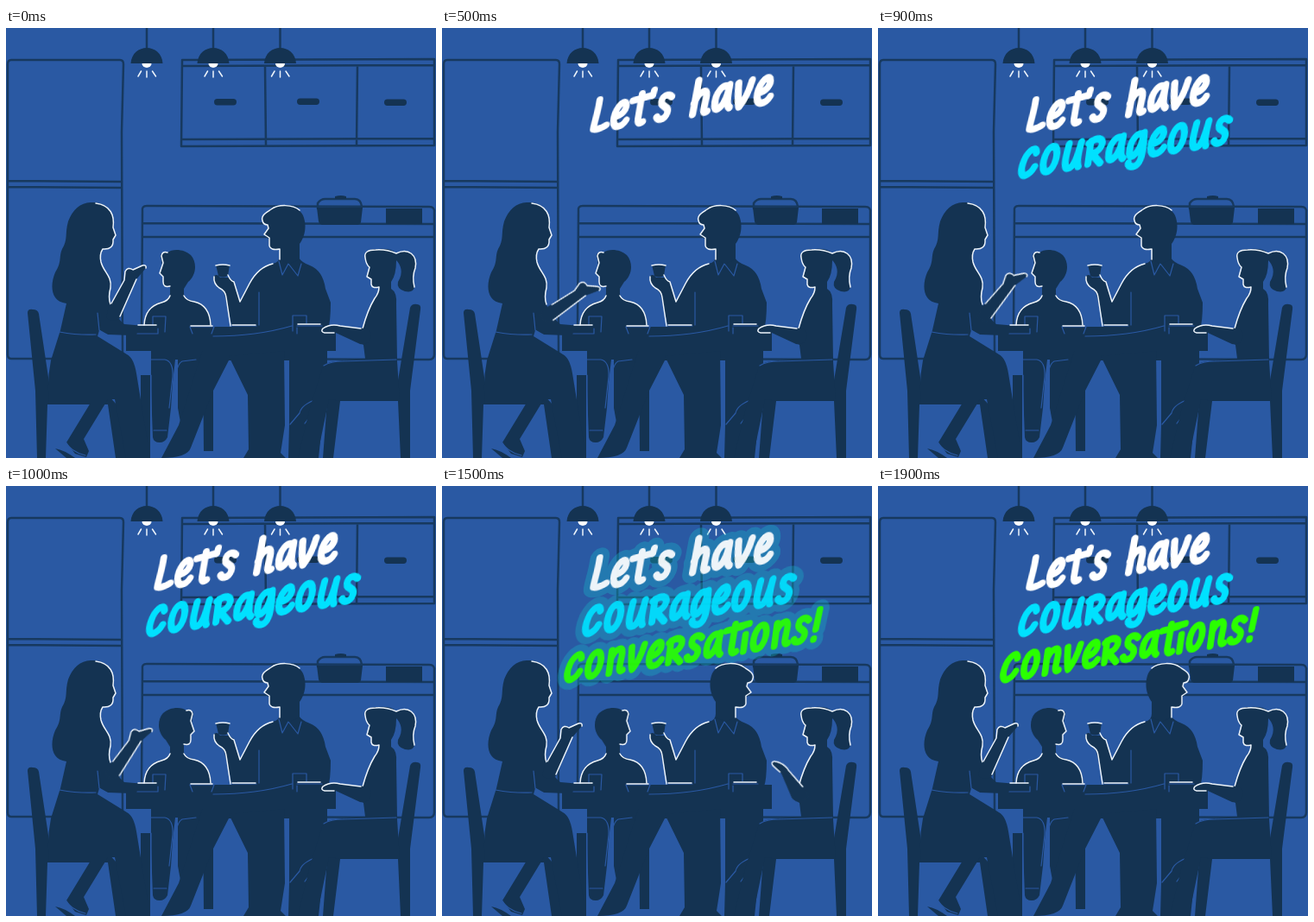
Write an HTML page that moves like this. It is 498 by 498 pixels and loops after 2 s.

```html
<!DOCTYPE html>
<html lang="en">
<head>
<meta charset="utf-8">
<title>Let's have courageous conversations!</title>
<style>
  html, body { margin: 0; width: 100%; height: 100%; overflow: hidden; background: #2a59a3; }
  svg { display: block; width: 100%; height: 100%; }
  .dark { fill: #143352; }
  .line { fill: none; stroke: #17395f; stroke-width: 2.5; stroke-linecap: round; stroke-linejoin: round; }
  .rim { fill: none; stroke: #edf4fb; stroke-width: 1.5; stroke-linecap: round; stroke-linejoin: round; }
  .seam { fill: none; stroke: #2a59a3; stroke-width: 1.2; stroke-linecap: round; stroke-linejoin: round; }
  .letters { fill: none; stroke-width: 8; stroke-linecap: round; stroke-linejoin: round; }
  .halo { stroke: #18b4c8; stroke-width: 23; opacity: 0; animation: glow 2s infinite; }
  #title { animation: tint 2s infinite; }
  .word, .arm, .head { animation: 2s infinite; }
  #word0 { stroke: #fff; animation-name: show0; }
  #word1 { stroke: #fff; animation-name: show1; }
  #word2 { stroke: #00e1ff; animation-name: show2; }
  #word3 { stroke: #2aff00; animation-name: show3; }
  #motherArm { transform-origin: 122px 330px; animation-name: gesture; }
  #girlArm { transform-origin: 414px 357px; animation-name: raise; }
  #boyHead { transform-origin: 198px 0; animation-name: turnBoy; }
  #fatherHead { transform-origin: 328.5px 0; animation-name: turnFather; }

  @keyframes show0 { 0%, 9.9% { opacity: 0 } 10%, 100% { opacity: 1 } }
  @keyframes show1 { 0%, 19.9% { opacity: 0 } 20%, 100% { opacity: 1 } }
  @keyframes show2 { 0%, 34.9% { opacity: 0 } 35%, 100% { opacity: 1 } }
  @keyframes show3 { 0%, 54.9% { opacity: 0 } 55%, 100% { opacity: 1 } }
  @keyframes glow {
    0%, 60% { opacity: 0; animation-timing-function: steps(3) }
    75% { opacity: .36; animation-timing-function: steps(2) }
    85%, 100% { opacity: 0 }
  }
  @keyframes tint {
    0%, 60% { opacity: 1; animation-timing-function: steps(3) }
    75% { opacity: .92; animation-timing-function: steps(2) }
    85%, 100% { opacity: 1 }
  }
  @keyframes gesture {
    0% { transform: rotate(0deg); animation-timing-function: steps(5) }
    25% { transform: rotate(29deg); animation-timing-function: steps(7) }
    60%, 100% { transform: rotate(0deg) }
  }
  @keyframes raise {
    0%, 60% { transform: rotate(0deg); animation-timing-function: steps(3) }
    75% { transform: rotate(42deg); animation-timing-function: steps(4) }
    95%, 100% { transform: rotate(0deg) }
  }
  @keyframes turnBoy { 0%, 49.9% { transform: none } 50%, 100% { transform: scaleX(-1) } }
  @keyframes turnFather { 0%, 54.9% { transform: none } 55%, 100% { transform: scaleX(-1) } }
</style>
</head>
<body>
<svg viewBox="0 0 498 498" role="img" aria-label="Let's have courageous conversations!">
  <defs>
    <g id="lamp">
      <path class="line" d="M0 0V24"/>
      <path class="dark" d="M-18.5 41C-17 17 17 17 18.5 41Z"/>
      <path d="M-5.5 41a5.5 5 0 0 0 11 0Z" fill="#fff"/>
      <path class="rim" d="M-6.5 50L-10 56M0 50V57M6.5 50L10.5 56"/>
    </g>
  </defs>
  <rect width="498" height="498" fill="#2a59a3"/>

  <!-- kitchen -->
  <g class="line">
    <path d="M6 37H132Q136 37 136 42L134 120L135 378Q135 383 130 383H6Q2 383 2 378V42Q2 37 6 37ZM2 177L134 178M2 184L134 185"/>
    <path d="M204 37L496 36V136L203 137ZM204 44L496 43M204 129L496 128M300 44L301 136M407 44L406 136"/>
    <path d="M157 345L158 212Q157 206 163 206L490 207Q497 207 496 214V378Q496 384 490 384L230 383M158 226L496 227M158 242L496 242"/>
    <path d="M361 209V203Q364 198 370 198H404Q411 198 412 207"/>
  </g>
  <g class="dark">
    <path d="M360 208H413L411 225Q410 228 406 228H367Q363 228 362 224ZM381 195Q388 193 394 195V198H381ZM440 209H482V227H440Z"/>
    <rect x="241" y="82" width="26" height="7.5" rx="3.7"/>
    <rect x="337" y="81.5" width="26" height="7.5" rx="3.7"/>
    <rect x="438" y="82.5" width="26" height="7.5" rx="3.7"/>
  </g>
  <use href="#lamp" x="163"/><use href="#lamp" x="240"/><use href="#lamp" x="317.5"/>

  <g class="letters halo" id="halo"></g>
  <g class="letters" id="title"></g>

  <!-- chairs -->
  <g class="dark">
    <path d="M25 330Q25 325 31 326Q37 326 38 331L50 411L118 425L128 436L140 498H127L118 436H48L46 498H36L34 420Z"/>
    <path d="M468 324Q470 319 476 320Q481 320 480 326L468 420L468 498H457L454 432H387L379 498H367L373 418L454 408Z"/>
  </g>

  <!-- boy -->
  <g class="dark">
    <path d="M190 292H206V308Q206 314 217 316Q237 320 238 346H159Q160 322 180 317Q190 315 190 308Z"/>
    <path d="M168 372H232V384H196L193 410L191 440L187 474Q184 480 178 480Q171 480 170 474L168 420Z"/>
    <path d="M199 380H240V430L203 462L199 440Z"/>
    <path d="M156 402H167V498H156ZM228 374H240V490H229Z"/>
  </g>
  <path class="rim" d="M160 344Q161 323 180 318Q188 316 190 310M206 310Q209 316 218 317Q236 321 237 344"/>
  <g class="head" id="boyHead">
    <path class="dark" d="M180 268C177 262 181 258 187 260C193 255 207 256 214 263C222 272 220 287 211 294L206 302H190L190 299Q182 301 182 295L182 288L178 284L181 277Z"/>
    <path class="rim" d="M187 260Q181 258 180 264L182 272L178 284L182 288V294Q182 301 190 299"/>
  </g>

  <!-- father -->
  <g class="dark">
    <path d="M318 256H339V266Q343 272 352 275Q367 281 370 302L376 318Q376 340 373 348H262L254 312Q253 304 244 299Q239 293 241 287Q245 284 248 289H258L264 293L271 317L282 296Q292 277 309 273Q317 271 317 264Z"/>
    <path d="M243 274H259L257 287Q251 290 246 287Z"/>
    <path d="M228 372H330V385H258L240 420L214 486Q210 498 180 498L200 460Z"/>
    <path d="M258 380L322 374L323 460L318 492L324 498H275L281 488L280 425Z"/>
    <path d="M328 374H372V400L362 498H327L328 460Z"/>
  </g>
  <path class="rim" d="M243 275Q251 273 259 275M241 288Q240 296 247 301Q254 304 255 312L260 345M257 286Q260 293 264 294L271 317L282 296Q292 277 309 273"/>
  <path class="seam" d="M316 270L320 286L327 273L338 287L342 273M293 306V344M360 430Q342 436 340 446L329 459M346 458L361 438"/>
  <g class="head" id="fatherHead">
    <path class="dark" d="M297 223C295 216 304 213 307 209C319 202 338 205 344 217C349 229 346 242 340 250V268L328 273L317 268V256Q306 258 305 253L304 244L299 239L303 232V228Q297 228 297 223Z"/>
    <path class="rim" d="M340 211C332 204 315 204 307 210C301 214 295 217 297 223Q298 228 303 228L304 232L299 239L305 243V252Q306 258 317 256V268"/>
  </g>

  <!-- girl -->
  <path class="dark" d="M416 266C413 257 425 256 431 256Q447 255 452 261C466 254 477 263 474 278Q470 288 473 300Q472 307 462 305Q452 302 454 294C461 283 457 274 452 269Q452 286 446 294V302Q453 306 452 320L453 386L456 432H389L374 430L360 498H338L352 440L366 395Q369 387 382 386L416 383L414 367Q406 363 408 355L414 345Q419 325 427 312Q432 306 432 300Q423 302 423 297V292L418 288L421 280Z"/>
  <path class="rim" d="M452 261Q440 256 428 257Q414 257 416 266Q417 274 421 277L418 288L423 291V297Q424 302 432 300Q432 307 427 313Q419 326 413 348M452 261C466 254 477 263 474 278Q470 288 473 300"/>
  <path class="seam" d="M368 391Q376 386 390 386L452 384"/>

  <!-- mother -->
  <g class="dark">
    <path d="M98 202C117 201 127 214 124 231L127 240L124 245Q125 257 112 256Q108 262 110 271C113 283 123 287 121 301Q118 312 121 321Q130 338 137 343L173 346Q183 348 181 353L172 357L118 355L108 350L106 357L140 378Q148 382 151 400L167 498H139L126 430H118L90 476L96 490L93 497L80 493L70 480L98 434H50Q47 410 52 385L63 350L70 319C51 317 51 297 57 283C65 271 61 265 65 256C72 245 68 238 72 224Q80 203 98 202Z"/>
    <path d="M57 487Q68 489 80 498H70Z"/>
  </g>
  <path class="rim" d="M104 203C121 205 126 217 124 231L127 240L124 245Q125 257 112 256Q108 262 110 271C113 283 123 287 121 301Q118 312 121 320"/>
  <path class="seam" d="M62 352Q84 356 104 355M106 330L108 350L118 356M68 478Q75 491 92 495"/>
  <g class="arm" id="motherArm">
    <path class="dark" d="M119 323L137 292L138 282Q141 276 147 280L158 275Q163 274 162 278L151 291L132 336Q122 342 116 335Z"/>
    <path class="rim" d="M122 319L137 292L138 282Q141 276 147 280L158 275Q163 274 162 278M151 291L132 334"/>
  </g>

  <!-- table -->
  <path class="dark" d="M139 346H382V374H139Z"/>
  <g class="arm" id="girlArm">
    <path class="dark" d="M416 348L386 345Q376 342 367 348Q364 352 369 353L382 353L410 366Q420 368 423 357Q423 349 416 348Z"/>
    <path class="rim" d="M411 348L387 345Q376 342 367 348Q364 352 369 353H380"/>
  </g>
  <path class="dark" d="M169 333H185V352H169ZM332 332H348V352H332Z"/>
  <path class="seam" d="M170 334H185L184 352M170 334V344M332 351V333H348V342M213 346H241L238 354M213 346L216 354M261 345H290M337 345H366M240 357Q290 357 331 345M168 384H184Q194 386 193 404L189 440M196 418Q196 390 204 386L220 384M168 402V460M171 466H186M337 354V347M176 348V354H152"/>
  <path class="rim" d="M153 344H174M214 345H239M262 344H289M338 343H364"/>
</svg>
<script>
  // Brush lettering: advance width and centre-line strokes, baseline at 0.
  const bowl = "M18-22C12-31 2-20 4-6C6 4 16-4 18-24";
  const glyphs = {
    L: [22, "M6-34C6-20 3-10 3-2C8 0 14-2 18-4"],
    e: [23, "M5-12C13-12 19-18 16-25C12-31 3-20 4-8C5 3 15 1 19-6"],
    t: [20, "M11-33L10-6C10 0 13 1 16-1M1-27L20-29"],
    "'": [9, "M5-35L4-29"],
    s: [22, "M18-24C13-30 4-26 7-18C9-14 17-13 15-6C13 1 5 1 3-4"],
    h: [24, "M6-36L4 0M4-12C8-24 18-28 17-16L16-4C16 0 18 0 20-1"],
    a: [24, bowl + "M18-26C17-12 17-4 21-1"],
    v: [23, "M4-26C5-12 6-4 8 0C13-6 17-16 19-27"],
    c: [24, "M18-23C17-31 9-28 5-18C1-6 4 1 9 0C13-1 16-4 18-8"],
    o: [25, "M12-27C3-26 0-1 9 0C19 0 22-27 12-27Z"],
    u: [26, "M6-27C4-14 2 0 9 0C15 0 18-14 20-27C18-14 18-4 20 0"],
    r: [24, "M5-1V-26M3-24C14-32 22-24 17-17C15-13 10-12 6-12M8-12L19 0"],
    g: [24, bowl + "M18-26C20-6 20 9 11 10C6 10 4 7 4 5"],
    n: [25, "M5-26V0M5-16C9-28 19-31 18-18L17-6C17-1 19 0 21-1"],
    i: [12, "M5-19V0M-3-30L8-31"],
    "!": [13, "M8-34L6-12M5-1V-.5"]
  };
  const words = [
    ["Let's", 172, 119.5, 1],
    ["have", 286, 101, 1.05],
    ["courageous", 162, 172, 1.025],
    ["conversations!", 141, 225.5, 0.98]
  ];

  function add(parent, name, attributes) {
    const node = document.createElementNS("http://www.w3.org/2000/svg", name);
    for (const key in attributes) node.setAttribute(key, attributes[key]);
    return parent.appendChild(node);
  }

  const halo = document.getElementById("halo");
  const title = document.getElementById("title");

  words.forEach(([word, x, y, scale], index) => {
    const transform = `translate(${x} ${y}) rotate(-9.3) skewX(-17) scale(${scale})`;
    const front = add(title, "g", { id: "word" + index, class: "word" });
    const layers = [halo, front].map(parent => add(parent, "g", { transform }));
    let pen = 0;
    for (const letter of word) {
      const [advance, d] = glyphs[letter];
      layers.forEach(layer => add(layer, "path", { d, transform: `translate(${pen})` }));
      pen += advance;
    }
  });
</script>
</body>
</html>
```
